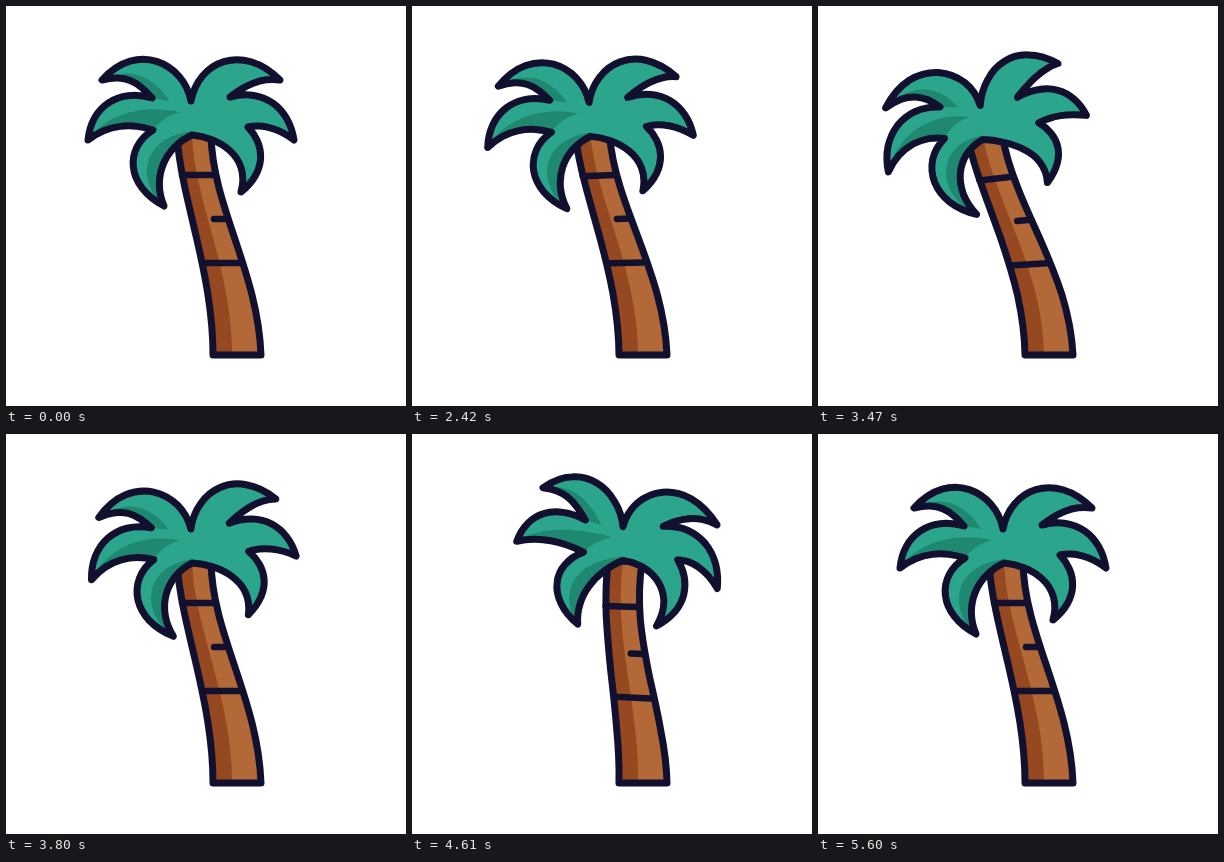
An HTML page that plays this animation: 400 px wide and 400 px high, repeating every 5630 ms.

```html
<!DOCTYPE html>
<html lang="en">
<head>
<meta charset="utf-8">
<title>Swaying palm</title>
<style>
  html, body { margin: 0; width: 100%; height: 100%; overflow: hidden; background: #fff; }
  svg { display: block; width: 100vw; height: 100vh; }
  .line { fill: none; stroke: #11112f; stroke-width: 7; stroke-linecap: round; stroke-linejoin: round; }
  .ring { stroke-width: 6.5; }
  .bark { fill: #b26837; }
  .bark-shade { fill: #964820; }
  .leaf { fill: #2ca58d; }
  .leaf-shade { fill: #1e8970; }
</style>
</head>
<body>
<svg viewBox="0 0 400 400"></svg>
<script>
const LOOP = 5630;
const BASE_Y = 349;
const HUB = { x: 185, y: 110 };

const trunk = 'M171 128 C174 190 207 265 207 349 L255 349 C252 265 206 200 205 128 Z';
const trunkShade = 'M171 128 C174 190 207 265 207 349 L226 349 C226 262 188 195 186 128 Z';
const rings = 'M176 169 L208 169 M198 257 L233 257 M208 213 L221 213';

const crown = `M185 95 C178 58 132 34 96 74 C120 68 132 76 146 92
  C112 82 85 101 82 134 C102 118 126 117 147 124
  C118 142 120 180 158 200 C146 172 158 142 186 129
  C212 131 245 150 235 186 C262 164 258 138 242 121
  C256 118 272 122 288 134 C283 102 258 82 224 91
  C238 80 255 71 274 74 C236 36 192 56 185 95 Z`;
const crownShade = `M96 74 C128 58 150 74 163 95 L146 92 C132 76 120 68 96 74 Z
  M82 134 C101 107 138 98 174 106 C160 110 152 117 147 124 C126 117 102 118 82 134 Z
  M158 200 C130 176 134 132 186 125 L186 129 C158 142 146 172 158 200 Z`;

// Rest, full left, full right, rest; the fronds trail behind the trunk.
const swayTimes = [2000, 3200, 4400, 5600];
const trailTimes = [2000, 3380, 4560, 5600];
const stops = [0, -1, 1, 0];

function swing(t, times) {
  if (t <= times[0] || t >= times[3]) return 0;
  const i = t < times[1] ? 0 : t < times[2] ? 1 : 2;
  const u = (t - times[i]) / (times[i + 1] - times[i]);
  return stops[i] + (stops[i + 1] - stops[i]) * (1 - Math.cos(Math.PI * u)) / 2;
}

// The trunk bends more the higher it gets, and its cross sections tilt along.
function bendTrunk(x, y, { sway }) {
  const k = (BASE_Y - y) / 220;
  const mid = 231 - 45 * k;
  const even = sway * sway;
  const tilt = 0.11 * sway * Math.sqrt(k) - 0.1 * even * k * k;
  return [
    x + 27 * sway * k ** 1.75,
    y + tilt * (x - mid) + sway * k * (11 - 14.5 * k) + even * k * (20 - 17 * k)
  ];
}

// The crown rides on the trunk and turns more towards the frond tips.
function bendCrown(x, y, { sway, trail }) {
  const dx = x - HUB.x, dy = y - HUB.y;
  const even = sway * sway;
  const a = (0.25 * trail - 0.035 * even) * Math.hypot(dx, dy) / 100;
  const c = Math.cos(a), s = Math.sin(a);
  return [
    HUB.x + dx * c - dy * s + 28.5 * sway - even,
    HUB.y + dx * s + dy * c - 4.5 * sway + 2 * even
  ];
}

const mix = (p, q) => [(p[0] + q[0]) / 2, (p[1] + q[1]) / 2];

function halve([a, b, c, d]) {
  const ab = mix(a, b), bc = mix(b, c), cd = mix(c, d);
  const abc = mix(ab, bc), bcd = mix(bc, cd), m = mix(abc, bcd);
  return [[a, ab, abc, m], [m, bcd, cd, d]];
}

// Parse a path and cut each curve in four, so that it bends faithfully.
function parse(path) {
  let last;
  return path.match(/[MLCZ][^MLCZ]*/g).flatMap(part => {
    const n = (part.match(/\d+/g) || []).map(Number);
    const pts = [];
    for (let i = 0; i < n.length; i += 2) pts.push([n[i], n[i + 1]]);
    const start = last;
    last = pts.at(-1) || last;
    if (part[0] !== 'C') return [{ cmd: part[0], pts }];
    return halve([start, ...pts]).flatMap(halve)
      .map(curve => ({ cmd: 'C', pts: curve.slice(1) }));
  });
}

const svg = document.querySelector('svg');
const parts = [
  ['bark', trunk, bendTrunk],
  ['bark-shade', trunkShade, bendTrunk],
  ['line ring', rings, bendTrunk],
  ['line', trunk, bendTrunk],
  ['leaf', crown, bendCrown],
  ['leaf-shade', crownShade, bendCrown],
  ['line', crown, bendCrown]
].map(([name, path, bend]) => {
  const el = document.createElementNS(svg.namespaceURI, 'path');
  el.setAttribute('class', name);
  svg.append(el);
  return { el, segments: parse(path), bend };
});

function draw(t) {
  const pose = { sway: swing(t, swayTimes), trail: swing(t, trailTimes) };
  for (const { el, segments, bend } of parts) {
    el.setAttribute('d', segments.map(({ cmd, pts }) =>
      cmd + pts.map(([x, y]) => bend(x, y, pose).map(v => v.toFixed(2)).join(' ')).join(' ')
    ).join(''));
  }
}

function tick() {
  draw(performance.now() % LOOP);
  requestAnimationFrame(tick);
}
tick();
</script>
</body>
</html>
```
